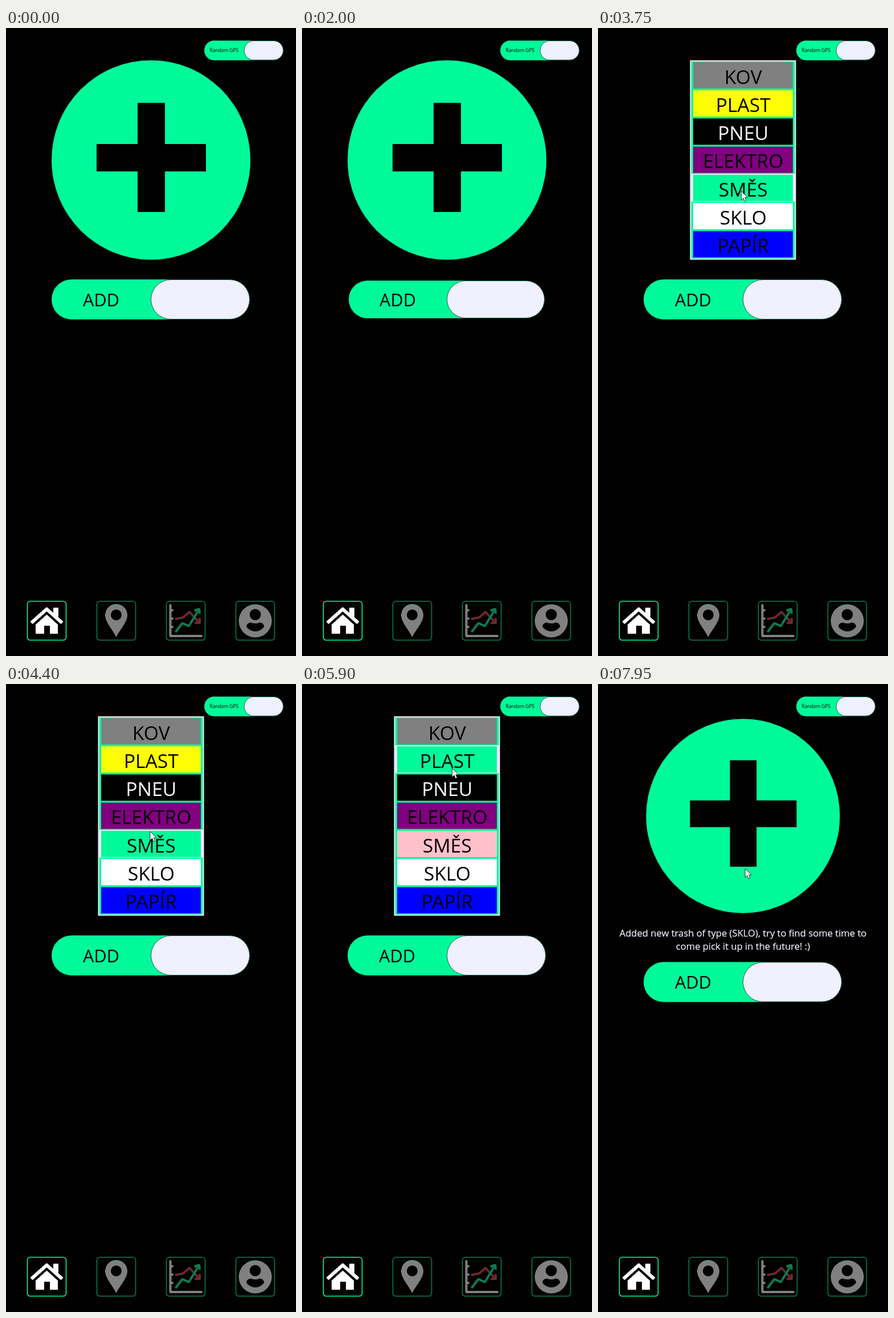
An HTML page that plays this animation: 509x1099 px, repeating every 8000 ms.

```html
<!DOCTYPE html>
<html lang="en">
<head>
<meta charset="utf-8">
<title>Trash tracker</title>
<style>
  html, body { margin: 0; width: 100%; height: 100%; overflow: hidden; background: #000; }
  svg { display: block; width: 100%; height: 100%; }
  text { font-family: "Open Sans", "Noto Sans", sans-serif; text-anchor: middle; }
  .box { fill: none; stroke: #00fa9a; stroke-width: 1.6; }
  .tab { opacity: .5; }
  .line { fill: none; stroke-width: 4; stroke-linecap: round; stroke-linejoin: round; }
  #note { font-size: 16.6px; fill: #f0f0ff; stroke: #f0f0ff; stroke-width: .2; }
</style>
</head>
<body>
<svg viewBox="0 0 509 1099">
  <g id="gps"></g>

  <g id="plus">
    <circle cx="254.5" cy="231" r="174.5" fill="#00fa9a"/>
    <path d="M231 131H279V203H351V251H279V322H231V251H159V203H231Z"/>
  </g>

  <g id="list">
    <rect x="162.5" y="57.5" width="184" height="347" fill="#00fa9a" stroke="#eeeeff" stroke-width="2"/>
    <g id="rows"></g>
  </g>

  <g id="note">
    <text x="254.5" y="442">Added new trash of type (SKLO), try to find some time to</text>
    <text x="254.5" y="464.5">come pick it up in the future! :)</text>
  </g>

  <g id="add"></g>

  <g id="home">
    <rect class="box" x="37.5" y="1003.3" width="68" height="68" rx="5"/>
    <path fill="#fff" d="M83 1014.500H92V1034L83 1026Z M52 1040L71.500 1022.500L91 1040V1060H77V1046H67V1060H52Z"/>
    <path fill="none" stroke="#000" stroke-width="9" d="M47 1042.500L71.500 1020.500L96 1042.500"/>
    <path fill="none" stroke="#fff" stroke-width="6" stroke-linejoin="round" d="M44.500 1041L71.500 1017L98.500 1041"/>
  </g>

  <g class="tab">
    <rect class="box" x="159.500" y="1003.3" width="68" height="68" rx="5"/>
    <path fill="#fff" fill-rule="evenodd" d="M193.500 1066C188 1054 174 1040 174 1027.500A19.500 19.500 0 0 1 213 1027.500C213 1040 199 1054 193.500 1066ZM184 1027a9.500 9.500 0 1 0 19 0a9.500 9.500 0 1 0 -19 0Z"/>
  </g>

  <g class="tab">
    <rect class="box" x="281.500" y="1003.3" width="68" height="68" rx="5"/>
    <path class="line" stroke="#fff" d="M288.500 1010V1064H343M289 1019H292M289 1033.500H292M289 1048H292"/>
    <path class="line" stroke="#d85454" d="M298.500 1034L311 1031.500L322 1022L338 1039M340 1034V1041H333"/>
    <path class="line" stroke="#18f5a4" d="M298.500 1056L309.500 1041.500L321 1046.500L338 1019M332 1019L339 1017L340 1023"/>
  </g>

  <g class="tab">
    <rect class="box" x="403.500" y="1003.3" width="68" height="68" rx="5"/>
    <circle cx="437.500" cy="1037.500" r="29" fill="#fff"/>
    <circle cx="437.500" cy="1026.500" r="9.800"/>
    <path d="M422 1048C422 1043 426 1040.500 430 1040.500Q437.500 1043.500 445 1040.500C449 1040.500 453 1043 453 1048C449 1053 443 1056 437.500 1056C432 1056 426 1053 422 1048Z"/>
  </g>

  <path id="cursor" d="M0 0V15.500L3.600 12.200L6 18L8.700 16.800L6.300 11.200H11Z" fill="#fff" stroke="#222" stroke-width=".9"/>
</svg>

<script>
  const LOOP = 8000, PRESS = 1900, SHOW = 2200, OPEN = 3500, CHOOSE = 7350;
  const ROW_TOP = 58.5, ROW_STEP = 49.3;
  const $ = id => document.getElementById(id);
  const kinds = [
    ['KOV', '#808080'], ['PLAST', '#ffff00'], ['PNEU', '#000'], ['ELEKTRO', '#800080'],
    ['SMĚS', '#ffc0cb'], ['SKLO', '#fff'], ['PAPÍR', '#0000ff']
  ];
  // time, x, y
  const path = [
    [SHOW, 262, 432], [2900, 251.5, 285.5], [4200, 251.5, 285.5], [5000, 261, 110.5],
    [5200, 261, 110.5], [5900, 263.5, 147.5], [6100, 263.5, 147.5], [6900, 258.3, 323]
  ];

  const clamp = v => Math.max(0, Math.min(1, v));
  const ease = v => { v = clamp(v); return v * v * (3 - 2 * v); };
  const show = (id, on) => $(id).setAttribute('visibility', on ? 'visible' : 'hidden');

  function pill(x, y, w, h, label, size) {
    const r = h / 2, mid = x + w / 2;
    return `<path fill="#00fa9a" d="M${mid + r} ${y}H${x + r}A${r} ${r} 0 0 0 ${x + r} ${y + h}H${mid + r}Z"/>
      <rect x="${mid + .5}" y="${y + .5}" width="${w / 2 - 1}" height="${h - 1}" rx="${r - .5}"
        fill="#f0f0ff" stroke="#0b6b4a"/>
      <text x="${x + w / 4}" y="${y + r + size * .39}" font-size="${size}">${label}</text>`;
  }

  function cursorAt(t) {
    let i = 0;
    while (i < path.length - 2 && t > path[i + 1][0]) i++;
    const [t0, x0, y0] = path[i], [t1, x1, y1] = path[i + 1];
    const k = ease((t - t0) / (t1 - t0));
    return [x0 + (x1 - x0) * k, y0 + (y1 - y0) * k];
  }

  $('gps').innerHTML = pill(348, 22, 139, 34.5, 'Random GPS', 8.3);
  $('rows').innerHTML = kinds.map(([name], i) => {
    const y = ROW_TOP + i * ROW_STEP;
    return `<rect x="163.500" y="${y - .5}" width="182.500" height="48.500" fill="#f0f0ff"/>
      <rect x="167" y="${y + 1.2}" width="175" height="46"/>
      <text x="254.800" y="${y + 39}" font-size="33.700" fill="${name === 'PNEU' ? '#fff' : '#000'}">${name}</text>`;
  }).join('');
  const rects = $('rows').querySelectorAll('rect');

  function draw(t) {
    const listed = t >= OPEN && t < CHOOSE, added = t >= CHOOSE;
    const [x, y] = cursorAt(t);
    show('cursor', t >= SHOW);
    $('cursor').setAttribute('transform', `translate(${x} ${y})`);

    const hover = added ? ease((t - CHOOSE) / 200) : ease((t - 2400) / 200);
    $('plus').setAttribute('transform', `translate(254.5 231) scale(${1 - .0255 * hover}) translate(-254.5 -231)`);
    show('plus', !listed);
    show('list', listed);
    show('note', added);

    const inset = 2 * (ease((t - PRESS) / 100) - ease((t - SHOW) / 100));
    $('add').innerHTML = pill(80 + inset, 440 + inset + (added ? 46.5 : 0),
      348 - 2 * inset, 70 - 2 * inset, 'ADD', 30.5);

    const active = Math.floor((y - ROW_TOP) / ROW_STEP);
    kinds.forEach(([, color], i) => {
      rects[2 * i].setAttribute('fill-opacity', i === active ? 1 : 0);
      rects[2 * i + 1].setAttribute('fill', i === active ? '#00fa9a' : color);
    });
  }

  const start = performance.now();
  function tick(now) {
    draw(Math.max(0, now - start) % LOOP);
    requestAnimationFrame(tick);
  }
  draw(0);
  requestAnimationFrame(tick);
</script>
</body>
</html>
```
